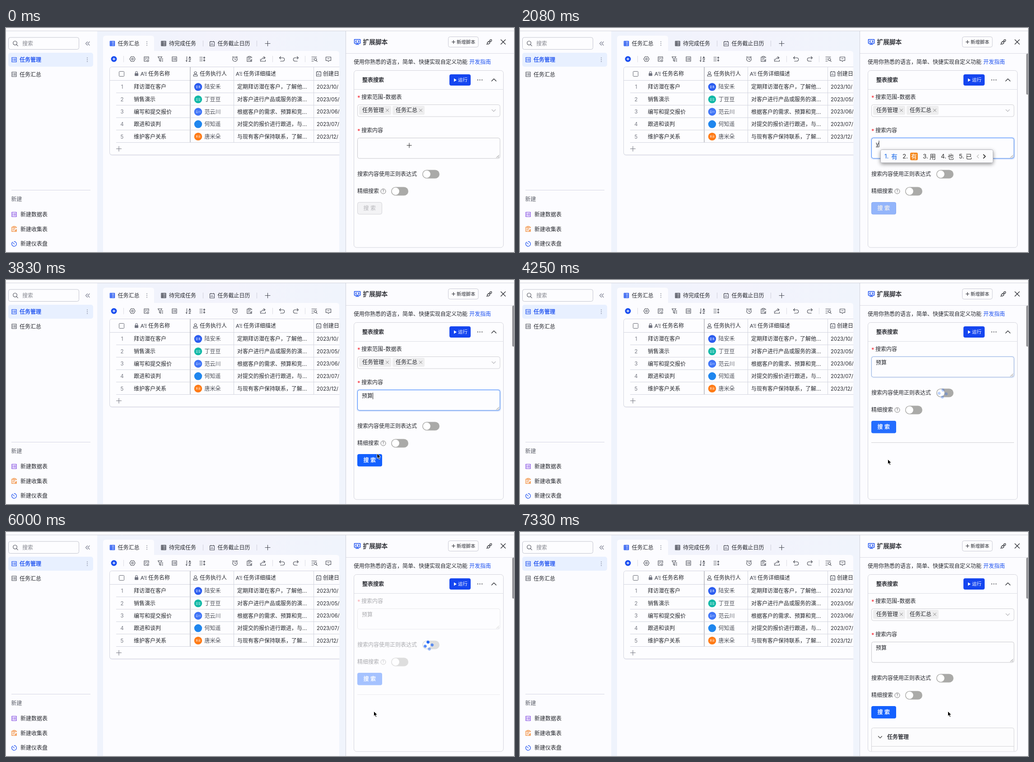
Recreate the animation shown at these times as an HTML page. Size 1125 by 498 pixels, loop 8 s.

```html
<!DOCTYPE html>
<html lang="zh-CN">
<head>
<meta charset="utf-8">
<title>整表搜索</title>
<style>
html, body { margin: 0; width: 100%; height: 100%; overflow: hidden; background: #fcfcff; }
svg { display: block; width: 100vw; height: 100vh; }
text { font-family: Inter, 'Noto Sans CJK SC', 'Noto Sans CJK', sans-serif; white-space: pre; }
</style>
</head>
<body>
<svg id="stage" viewBox="0 0 1125 498" xmlns="http://www.w3.org/2000/svg"></svg>
<script>
const INK = '#24262c', GREY = '#5b5e68', BLUE = '#1a4ff0', RULE = '#d3d5df';

// Drawing helpers: text is centred on y, icons are centred on x, y.
const text = (x, y, s, fill = INK, size = 12, more = '') =>
  `<text x="${x}" y="${y + size * .37}" fill="${fill}" font-size="${size}" ${more}>${s}</text>`;
const medium = (x, y, s, fill = INK, size = 12) =>
  text(x, y, s, fill, size, `stroke="${fill}" stroke-width=".35"`);
const box = (x, y, w, h, r, fill, stroke = 'none', more = '') =>
  `<rect x="${x}" y="${y}" width="${w}" height="${h}" rx="${r}" fill="${fill}" stroke="${stroke}" ${more}/>`;
const path = (d, stroke = RULE, w = 1, more = '') =>
  `<path d="${d}" fill="none" stroke="${stroke}" stroke-width="${w}" ${more}/>`;
const shape = (d, fill) => `<path d="${d}" fill="${fill}"/>`;
const dot = (x, y, r, fill, more = '') => `<circle cx="${x}" cy="${y}" r="${r}" fill="${fill}" ${more}/>`;
const icon = (x, y, name, color = '#454852', w = 1.1) =>
  path(ICONS[name], color, w, `transform="translate(${x} ${y})" stroke-linecap="round" stroke-linejoin="round"`);
const dots = (x, y, dx, dy, color) => [-1, 0, 1].map(i => dot(x + i * dx, y + i * dy, 1, color)).join('');

const ICONS = {
  list: 'M-5-5h10v10h-10zM-3-2h1M0-2h3M-3 0h1M0 0h3M-3 2h1M0 2h3',
  grid: 'M-5-5h10v10h-10zM-5-2.4h10M-5 0h10M-5 2.5h10M-2-5v10',
  calendar: 'M-5-4.5h10v9.5h-10zM-2.5-6v2M2.5-6v2M-2.5 2v-2M0 2v-3M2.5 2v-1',
  find: 'M-1-5a4.4 4.4 0 1 0 .1 0M2.3 2.8l3 3',
  fold: 'M-.5-4l-4 4 4 4M4-4l-4 4 4 4',
  plus: 'M-5.5 0h11M0-5.5v11',
  cross: 'M-5-5l10 10M5-5l-10 10',
  tiny: 'M-3-3l6 6M3-3l-6 6',
  up: 'M-5 2.5l5-5 5 5',
  down: 'M-4-2l4 4.2 4-4.2',
  letter: 'M-6.5 4l3.3-8 3.3 8M-5.3 1.3h4.2M.5-3.5h6M2-.1h4.5M3.3 3.5h3.2',
  person: 'M0-5a2.6 2.6 0 1 0 .1 0M-4.3 5v-1.5q0-2.3 2.3-2.3h4q2.3 0 2.3 2.3v1.5z',
  gear: 'M-3-5.3h6l3 5.3-3 5.3h-6l-3-5.3zM0-2a2 2 0 1 0 .1 0',
  form: 'M5 0v-5h-10v10h5M-3-2h6M-3 1h2M3 1.7a2 2 0 1 0 .1 0',
  filter: 'M-5.5-5h9l-3.2 4.2v6l-2.6-2v-4zM3-.5h2.5M3 2.2h2.5M3 5h2.5',
  sort: 'M-3.5-5.5v11l-2-2M1-1l2-4.5 2 4.5M1.6-2.4h2.8M1 1h4l-4 4.5h4',
  height: 'M-6-4h6M-6 0h6M-6 4h6M4-4.5v9M2.3-3l1.7-1.7 1.7 1.7M2.3 3l1.7 1.7 1.7-1.7',
  alarm: 'M0-4.5a5 5 0 1 0 .1 0M0-2v3h2.3M-5.5-4l2-1.7M5.5-4l-2-1.7',
  clip: 'M-2-4.5h-3v10h10v-4M2-4.5h3v2M-2-6h4v2.7h-4zM-2.5-.5h5M-2.5 2.2h2M1.5 2.5l1.3 1.3 2.6-3',
  share: 'M-5.5 0v5h11v-3M-3 2q0-4.8 6-4.8M1.5-5.5l3.5 2.7-3.5 2.7',
  undo: 'M-2.5-5.5l-3 2.8 3 2.8M-5.3-2.7h7q4 0 4 3.7t-4 3.7h-5',
  redo: 'M2.5-5.5l3 2.8-3 2.8M5.3-2.7h-7q-4 0-4 3.7t4 3.7h5',
  scan: 'M-6-4.5h11M-6 0h4M-6 4.5h4M2.2-1.8a2.7 2.7 0 1 0 .1 0M4.2 3.6l2 2',
  comment: 'M-5.5-4.5h11v8h-4l-1.5 1.8-1.5-1.8h-4zM-2-.7h4',
  gauge: 'M-3.5-4a5.3 5.3 0 1 0 3.5-1.3M-2.3-2.3l2.7 2.7',
  monitor: 'M-6.5-5h13v8.5h-13zM0 3.5v2.5M-3.5 6h7M-1.8-2.5l-2 1.8 2 1.8M1.8-2.5l2 1.8-2 1.8',
  plug: 'M-1-1.5l-2.5 2.5q-1.7 2 0 3.3 1.7 1 3.3-.3l2-2zM1-3.5l2-1.5q1.5-.8 2.4.5 .8 1.5-.4 2.6l-1.7 1.7zM-5.5 5.5l1.7-1.3M.2-.3l1.3-1.2'
};

const rows = [
  ['拜访潜在客户', '陆安禾', '定期拜访潜在客户，了解他...', '2023/10/', '#2a5cf0'],
  ['销售演示', '丁豆豆', '对客户进行产品或服务的演...', '2023/05/', '#10b8a6'],
  ['编写和提交报价', '范云川', '根据客户的需求、预算和竞...', '2023/06/', '#3f74f7'],
  ['跟进和谈判', '何知遥', '对提交的报价进行跟进，与...', '2023/07/', '#1f86ee'],
  ['维护客户关系', '唐米朵', '与现有客户保持联系，了解...', '2023/12/', '#ff7a14']
];

const sidebar = () =>
  box(0, 7, 202, 491, 0, '#fcfcff') +
  box(5.5, 21, 156, 26.5, 4, '#fdfdff', '#c3c5cf') + icon(21, 34, 'find', '#555862', 1.2) +
  text(36, 34.5, '搜索', '#85878f') + icon(181, 34.5, 'fold', '#777a8c') +
  box(5, 55, 188, 31, 5, '#e8f0ff') + icon(18, 70.5, 'list', BLUE, 1.2) +
  medium(30, 71, '任务管理', BLUE) + dots(180, 70.5, 0, 4, '#8b90a5') +
  icon(18, 103, 'list') + text(30, 103.5, '任务汇总') +
  path('M12 360.5h175', '#d5d6e2') + text(11.5, 380.5, '新建', GREY) +
  icon(18, 414.5, 'list', '#7a3fe0', 1.2) + text(32, 414.5, '新建数据表') +
  icon(18, 447, 'clip', '#f07a1c', 1.2) + text(32, 447.5, '新建收集表') +
  icon(18, 480, 'gauge', BLUE, 1.2) + text(32, 480, '新建仪表盘');

const toolbar = () => {
  const tools = { gear: 280, form: 311, filter: 342, list: 373, sort: 404, height: 435, alarm: 507,
    clip: 539, share: 569, undo: 611, redo: 642, scan: 683, comment: 714 };
  return dot(239, 69, 6.5, BLUE) + path('M236 69h6M239 66v6', '#fff', 1.3) +
    path('M260.5 62v14M590.5 62v14M662.5 62v14', '#dcdde4') +
    Object.entries(tools).map(([name, x]) => icon(x, 69, name)).join('');
};

const table = () => {
  const line = i => 116.5 + i * 27.6;
  const body = rows.map(([task, who, note, date, color], i) => {
    const y = 131 + i * 27.6;
    const tag = i === 3 ? '' : text(425.5, y, who.slice(1), '#fff', 5.5, 'text-anchor="middle"');
    return text(257, y, i + 1, '#777a84', 11.5, 'text-anchor="middle"') + text(283, y, task) +
      dot(425.5, y, 8.7, color) + tag + text(439.5, y, who, '#4a4d56') +
      text(512, y, note) + text(688, y, date, INK, 11.4) + path(`M244 ${line(i + 1)}h500`);
  }).join('');
  return `<g clip-path="url(#sheet)">` +
    box(229.5, 88, 540, 195.5, 5, '#e9eaf2') + box(229.5, 86.5, 540, 195.5, 5, '#fdfdff', RULE) +
    path('M230 116.5h520') + path('M504.5 87v167.5M681.5 87v167.5') + path('M408 87v167.5', '#aaabb2', 1.3) +
    box(250.5, 96.5, 11, 11, 1, 'none', '#666973') +
    box(285, 100.5, 8, 6, 1, '#70737f') + path('M286.8 101v-2q0-2.5 2.2-2.5t2.2 2.5v2', '#70737f', 1.2) +
    icon(305, 102, 'letter') + text(315, 102, '任务名称') +
    icon(419.5, 102, 'person') + text(429, 102, '任务执行人') +
    icon(516, 102, 'letter') + text(526, 102, '任务详细描述') +
    icon(692.5, 102, 'calendar') + text(702, 102, '创建日期') +
    body + icon(250, 268.5, 'plus', '#777a84') + '</g>';
};

const sheet = () =>
  box(202, 7, 550, 491, 0, 'url(#haze)') +
  shape('M215 498V57q0-6 6-6h511q6 0 6 6v441z', '#fcfcff') +
  shape('M215 60V23q0-6 6-6h101q6 0 6 6v29h-20z', '#fcfcff') +
  icon(235.5, 34.5, 'grid', BLUE, 1.4) + text(247.5, 34.5, '任务汇总') + dots(312, 34.5, 0, 4, '#8b8e99') +
  icon(349, 34.5, 'grid', '#454852', 1.3) + text(361, 34.5, '待完成任务') +
  icon(456.5, 35, 'calendar') + text(468.5, 34.5, '任务截止日历') +
  path('M436.5 28v13M555.5 28v13', '#cfd0da') + icon(579.5, 34.5, 'plus') +
  toolbar() + table();

const toggle = (x, y) => box(x, y, 38, 19, 9.5, '#aaaaa8') + dot(x + 9.7, y + 9.5, 8.2, '#fff');
const label = (y, s) => text(778, y + 2, '*', '#f5222d', 13) + text(787, y, s);
const tag = (x, s) => box(x, 173, 71, 20, 3, '#eeeeef') + text(x + 7, 183, s) + icon(x + 62.5, 183, 'tiny', '#777', .9);

const scope = () =>
  label(153.5, '搜索范围-数据表') + box(778.5, 170.5, 315.5, 26.5, 4, '#fdfdff', '#d0d0d4') +
  tag(782, '任务管理') + tag(856, '任务汇总') + icon(1080, 183.5, 'down', '#b5b5b9');

const searchButton = () =>
  '<g id="idle">' + box(778.5, 387.5, 54, 26.5, 4, '#f3f3f5', '#d4d4d8') + text(791.5, 401, '搜 索', '#b4b4b8') + '</g>' +
  '<rect id="wave" fill="none" stroke="#1461ff"/><g id="active">' + box(778, 387, 55, 27.5, 4, '#1461ff') +
  box(778, 387, 55, 27.5, 4, '#4a8aff', 'none', 'id="hover"') + medium(791.5, 401, '搜 索', '#fff') + '</g>';

const fields = () =>
  label(227.5, '搜索内容') +
  box(777, 243, 318.5, 49, 5, 'none', '#3a7dff', 'id="glow" stroke-width="2"') +
  box(778.5, 244.5, 315.5, 45.5, 4, '#fdfdff', '#c8c8cc') +
  box(778.5, 244.5, 315.5, 45.5, 4, 'none', '#3a84ff', 'id="focus"') +
  path('M1086 288.5l6-6M1089.5 288.5l2.5-2.5', '#666', .9) +
  text(788, 258, '', INK, 12, 'id="typed"') + path('', '#333', 1, 'id="under"') + path('', '#222', 1, 'id="caret"') +
  text(778, 325, '搜索内容使用正则表达式') + toggle(922, 315.5) +
  text(778, 363, '精细搜索') + dot(835.5, 363, 5.5, 'none', 'stroke="#777"') +
  text(835.5, 363, '?', '#666', 8.5, 'text-anchor="middle"') + toggle(853, 353.5) +
  searchButton() + path('M778 435.5h316', '#d0d0d4', 1, 'id="divider"');

const result = () =>
  box(778.5, 435.5, 315.5, 80, 4, '#fcfcfd', '#d4d4d8') + path('M779 476.5h315', '#d4d4d8') +
  icon(797.5, 456, 'down', '#333') + medium(813, 456, '任务管理');

const spinner = () =>
  [[-1, -1], [1, -1], [1, 1], [-1, 1]].map(([x, y]) => dot(x * 5.5, y * 5.5, 3.3, '#1b62f5')).join('');

const panel = () =>
  box(752, 7, 373, 491, 0, '#fcfcff') + path('M752.5 7v491', '#cfd0da') + path('M753 56.5h372', '#dadbe3') +
  icon(778, 30.5, 'monitor', BLUE, 1.5) + medium(790.5, 31, '扩展脚本', INK, 13.7) +
  box(979.5, 19.5, 66.5, 23, 4, '#fdfdff', '#c9cad3') + path('M987 31h8M991 27v8', INK, 1.1) +
  text(998, 31, '新增脚本', INK, 10.3) + icon(1070, 31, 'plug', INK, 1.2) + icon(1101, 31, 'cross', INK, 1.3) +
  text(770, 75.5, '使用你熟悉的语言，简单、快捷实现自定义功能') + text(1026, 75.5, '开发指南', BLUE) +
  box(770.5, 94.5, 331, 393.5, 6, '#fdfdff', '#d3d4dc') + path('M771 136.5h331', '#dcdde3') +
  medium(789, 115.5, '整表搜索') +
  box(982, 103, 47, 25, 4, '#1546f0') + shape('M992 112v7.5l6-3.75z', '#fff') +
  text(1001, 115.5, '运行', '#fff', 10.5) + dots(1049.5, 115.5, 4.7, 0, INK) + icon(1080.5, 115.5, 'up', INK, 1.2) +
  `<g clip-path="url(#card)"><g id="form"><g id="scope">${scope()}</g><g id="fields">${fields()}</g>
   <g id="result">${result()}</g></g><g id="spin">${spinner()}</g></g>` +
  box(1121, 57, 6, 91, 2.5, '#97979b', 'none', 'id="bar"');

const cursors =
  `<g id="cursor"><path data-kind="cross" d="M-5.5 0h11M0-5.5v11" stroke="#222" fill="none"/>
  <path data-kind="beam" d="M-2.5-6.5q2.5 0 2.5 2v9q0 2-2.5 2M2.5-6.5q-2.5 0-2.5 2M0 4.5q0 2 2.5 2" stroke="#222" fill="none"/>
  <path data-kind="arrow" d="M0 0v11l2.5-2.3 1.8 4.2 2-.9-1.8-4h3.5z" fill="#000" stroke="#fff" stroke-width=".9"/>
  <path data-kind="hand" d="M-1.5 6V.8q0-1.3 1.2-1.3t1.2 1.3v3.2q2-.7 2.5.7 2-.7 2.3.7 1.8-.3 1.8 1.3v3q0 1.8-1.5 3.8h-5.5l-3.5-4.3q-.8-1.5.3-2t1.2-.2z" fill="#fff" stroke="#111"/></g>`;

document.getElementById('stage').innerHTML =
  `<defs><clipPath id="sheet"><path d="M215 51h523.5v447h-523.5z"/></clipPath>
  <clipPath id="card"><path d="M771 137h331v350.5h-331z"/></clipPath>
  <linearGradient id="haze"><stop stop-color="#eff3fc"/><stop offset=".5" stop-color="#f3f3fc"/><stop offset="1" stop-color="#f0f4fc"/></linearGradient>
  <filter id="shade" x="-10%" y="-60%" width="120%" height="240%"><feDropShadow dx="0" dy="3" stdDeviation="4" flood-opacity=".42"/></filter></defs>` +
  box(0, 0, 1125, 498, 0, '#fcfcff') + sheet() + sidebar() + panel() +
  path('M0 6.5h1125', '#d2d3da') + '<g id="popup"></g>' + cursors;

const $ = id => document.getElementById(id);
const fade = (id, v) => $(id).setAttribute('opacity', v);
const show = (id, on) => { $(id).style.display = on ? '' : 'none'; };

// Candidate window; '*' marks the emoji candidate.
const popup = words => {
  let x = 807, s = '';
  words.forEach((w, i) => {
    const emoji = w === '*', fill = i ? '#333' : '#1466e8';
    s += text(x, 285.5, `${i + 1}.`, fill, 13.5);
    s += emoji ? box(x + 17, 277, 17, 17, 3, '#f58a1f') + text(x + 19, 285.5, '有', '#fff', 13) : text(x + 15, 285.5, w, fill, 14);
    x += emoji ? 45 : 26 + 14 * w.length;
  });
  return box(798.5, 270.5, x - 763, 29, 3, '#fbfbfd', '#b4b5bb', 'filter="url(#shade)"') + s +
    path(`M${x + 4} 281.5l-4 4 4 4`, '#bbb', 1.1) + path(`M${x + 14} 281l4.5 4.5-4.5 4.5`, '#111', 1.6);
};

// Start time, text, caret x, candidates
const typing = [
  [0, '', 788],
  [1995, 'y', 795, ['有', '*', '用', '也', '已']],
  [2160, 'yu', 802, ['与', '于', '语', '雨', '鱼']],
  [2330, 'yu s', 812, ['预算', '于是', '预设', '雨伞', '与']],
  [2580, 'yu su', 819, ['预算', '语素', '雨水', '羽速']],
  [2745, '预算', 812.5]
];

// Eased value between [time, value] stops.
const track = (t, stops) => {
  for (let i = 1; i < stops.length; i++) {
    const [a, from] = stops[i - 1], [b, to] = stops[i];
    if (t < b) {
      const p = Math.max(0, (t - a) / (b - a));
      return from + (to - from) * p * p * (3 - 2 * p);
    }
  }
  return stops[stops.length - 1][1];
};

let current;
function drawTyping(t) {
  const step = typing.filter(s => t >= s[0]).pop();
  const blink = (t >= 995 && t < 1415) || (t >= 1995 && t < 3245) || (t >= 3745 && t < 4165);
  show('caret', blink);
  if (step === current) return;
  current = step;
  const [, word, x, words] = step;
  $('typed').textContent = word;
  $('caret').setAttribute('d', `M${x} 250.5v14.5`);
  $('under').setAttribute('d', words ? `M788 264.5H${x - .5}` : '');
  $('popup').innerHTML = words ? popup(words) : '';
}

function drawCursor(t, busy) {
  const x = track(t, [[3460, 893], [3920, 814.5], [7020, 814.5], [7330, 947.5]]);
  const y = track(t, [[3460, 261], [3920, 398.5]]);
  const onButton = !busy && x < 833 && y > 387;
  const kind = t < 330 ? 'cross' : y < 290 ? 'beam' : onButton ? 'hand' : 'arrow';
  show('cursor', t < 1995 || t >= 3495);
  $('cursor').setAttribute('transform', `translate(${x} ${kind === 'beam' ? y - 1 : y})`);
  for (const c of $('cursor').children) c.style.display = c.dataset.kind === kind ? '' : 'none';
}

function drawSpinner(t) {
  const e = Math.max(0, t - 4235) / 1000;
  $('spin').setAttribute('transform', `translate(936 252.5) rotate(${45 + e * 300})`);
  [...$('spin').children].forEach((c, i) => {
    const p = Math.max(0, e - i * .4) % 2;
    c.setAttribute('opacity', .3 + .7 * (p > 1 ? 2 - p : p));
  });
}

function drawWave(t) {
  const p = Math.min(1, Math.max(0, (t - 4250) / 600)), grow = 5 * (1 - (1 - p) ** 3);
  const attrs = { x: 778 - grow / 2, y: 387 - grow / 2, width: 55 + grow, height: 27.5 + grow, rx: 4 + grow / 2,
    'stroke-width': grow, opacity: .35 * (1 - p) };
  for (const k in attrs) $('wave').setAttribute(k, attrs[k]);
}

function draw(t) {
  const busy = t >= 4245 && t < 6575;
  const focus = track(t, [[960, 0], [1250, 1], [4080, 1], [4380, 0]]);
  const ready = Math.min(1, Math.max(0, (t - 2020) / 145));
  show('scope', !busy);
  show('spin', busy);
  show('divider', busy);
  show('result', t >= 6575);
  $('fields').setAttribute('transform', `translate(0 ${busy ? -74 : 0})`);
  fade('form', track(t, [[4235, 1], [4535, .38], [6530, .38], [6830, 1]]));
  fade('focus', focus);
  fade('glow', focus * .12);
  fade('bar', track(t, [[960, 0], [1080, 1]]));
  fade('idle', 1 - ready);
  fade('active', ready);
  fade('hover', track(t, [[3900, 0], [4100, .3], [4200, .3], [4450, 0], [6530, 0], [6750, .3], [7080, .3], [7300, 0]]));
  drawTyping(t);
  drawCursor(t, busy);
  drawSpinner(t);
  drawWave(t);
}

const TICK = 1000 / 12;
function loop() {
  const t = performance.now() % 8000;
  draw(Math.floor((t + 4) / TICK) * TICK % 8000);
  requestAnimationFrame(loop);
}
loop();
</script>
</body>
</html>
```
